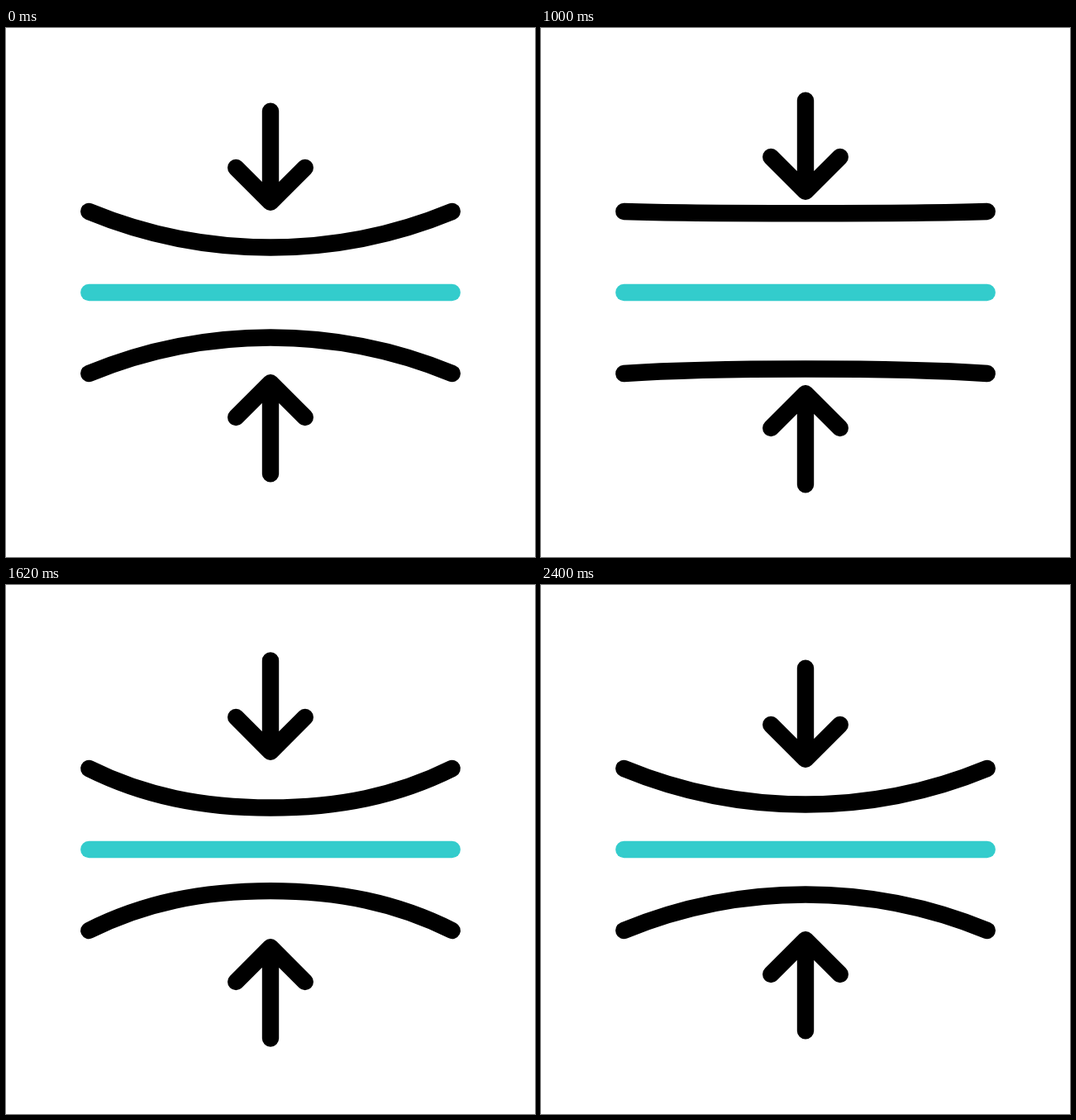
These frames come from a looping animation (640 by 640 pixels, 3 s). An HTML page with a canvas:

```html
<!DOCTYPE html>
<html lang="en">
<head>
<meta charset="utf-8">
<title>Compression arrows</title>
<style>
html, body { margin: 0; width: 100%; height: 100%; overflow: hidden; background: #fff; }
canvas { display: block; width: 640px; height: 640px; }
</style>
</head>
<body>
<canvas id="stage" width="640" height="640"></canvas>
<script>
const ctx = document.getElementById('stage').getContext('2d');
const LOOP = 3000, STEP = 20;
const LEFT = 100.3, RIGHT = 539.7, MID = 320;

// Bow: [sag, end handle x, end handle y, middle handle x]
const REST = [43.5, 69.8, 28.8, 75.5];
const PRESSED = [54.5, 66, 38, 83];
const ARCHED_TOP = [-24.2, 72, -15.8, 73.6];
const ARCHED_BOTTOM = [-19.2, 72, -12, 73.6];

const arrowKeys = [[200, [0]], [700, [26]], [1300, [-52]], [1900, [26]], [2400, [0]]];
const bowKeys = arched =>
  [[200, REST], [685, PRESSED], [1200, arched], [1715, PRESSED], [2200, REST]];
const topKeys = bowKeys(ARCHED_TOP);
const bottomKeys = bowKeys(ARCHED_BOTTOM);

const ease = u => u * u * (3 - 2 * u);

function sample(keys, t) {
  const next = keys.findIndex(([time]) => t < time);
  if (next === 0) return keys[0][1];
  if (next < 0) return keys[keys.length - 1][1];
  const [t0, from] = keys[next - 1], [t1, to] = keys[next];
  const k = ease((t - t0) / (t1 - t0));
  return from.map((v, i) => v + (to[i] - v) * k);
}

function strokePath(build, color = '#000') {
  ctx.strokeStyle = color;
  ctx.beginPath();
  build();
  ctx.stroke();
}

function drawBow([sag, hx, hy, mx]) {
  const y = 222, low = y + sag;
  strokePath(() => {
    ctx.moveTo(LEFT, y);
    ctx.bezierCurveTo(LEFT + hx, y + hy, MID - mx, low, MID, low);
    ctx.bezierCurveTo(MID + mx, low, RIGHT - hx, y + hy, RIGHT, y);
  });
}

function drawArrow(shift) {
  const tip = 210.8 + shift;
  strokePath(() => {
    ctx.moveTo(MID, 100.6 + shift);
    ctx.lineTo(MID, tip);
    ctx.moveTo(MID - 41.8, tip - 41.8);
    ctx.lineTo(MID, tip);
    ctx.lineTo(MID + 41.8, tip - 41.8);
  });
}

function drawHalf(bow, shift, flipped) {
  ctx.save();
  if (flipped) {
    ctx.translate(0, 640);
    ctx.scale(1, -1);
  }
  drawBow(bow);
  drawArrow(shift);
  ctx.restore();
}

function draw(t) {
  ctx.fillStyle = '#fff';
  ctx.fillRect(0, 0, 640, 640);
  ctx.lineWidth = 20.4;
  ctx.lineCap = ctx.lineJoin = 'round';
  const [shift] = sample(arrowKeys, t);
  drawHalf(sample(topKeys, t), shift, false);
  drawHalf(sample(bottomKeys, t), shift, true);
  strokePath(() => {
    ctx.moveTo(LEFT, 320);
    ctx.lineTo(RIGHT, 320);
  }, '#33cccc');
}

const start = performance.now();
function tick() {
  const t = (performance.now() - start) % LOOP;
  draw(Math.floor(t / STEP) * STEP);
  requestAnimationFrame(tick);
}
tick();
</script>
</body>
</html>
```
